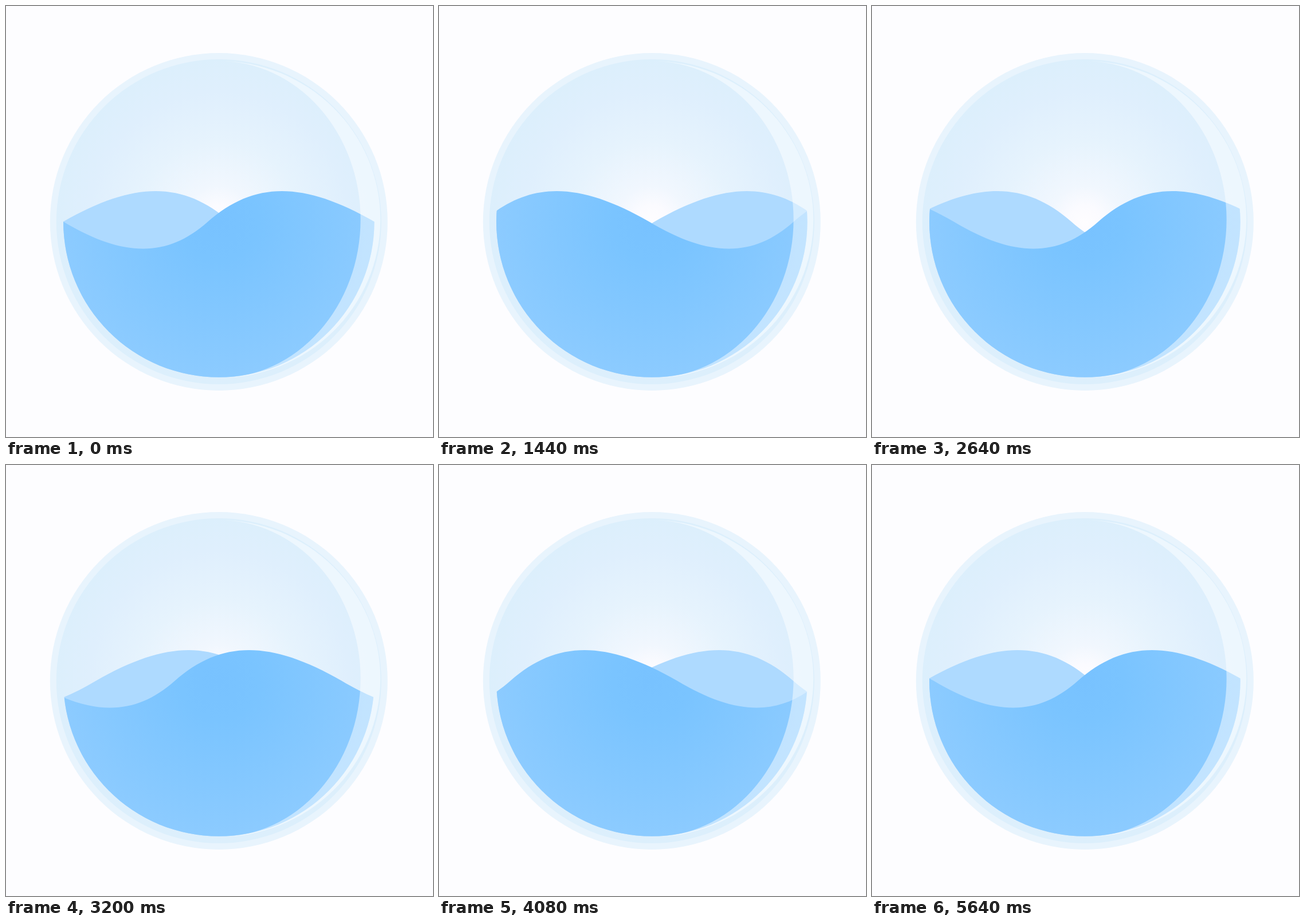
Recreate the animation shown at these times as an HTML page with a canvas. Size 745x752 px, loop 5.68 s.

```html
<!DOCTYPE html>
<html lang="en">
<head>
<meta charset="utf-8">
<title>Water ball</title>
<style>
  html, body { margin: 0; width: 100%; height: 100%; overflow: hidden; background: #fdfdff; }
  canvas { display: block; }
</style>
</head>
<body>
<canvas id="stage" width="745" height="752"></canvas>
<script>
const ctx = document.getElementById('stage').getContext('2d');
const CX = 371.3, CY = 376.5, RADIUS = 271.3;
const WAVE = RADIUS * 2;
const LOOP = 5680, STEP = 40;

// [time in ms, distance the front wave has moved left]; equal times make a jump
const TRAVEL = [
  [0, 0], [40, 7.5], [199, 7.5], [199, 36], [800, 152], [2080, 400],
  [3200, 600], [4080, 770], [4840, 920], [5640, 1078], [LOOP, WAVE * 2]
];

function travelAt(time) {
  const i = TRAVEL.findIndex(([t]) => t > time);
  const [t0, d0] = TRAVEL[i - 1], [t1, d1] = TRAVEL[i];
  return d0 + (d1 - d0) * (time - t0) / (t1 - t0);
}

function radial(radius, ...colors) {
  const g = ctx.createRadialGradient(CX, CY, 0, CX, CY, radius);
  colors.forEach(([at, color]) => g.addColorStop(at, color));
  return g;
}

const AIR = radial(283.5, [0, '#fefdff'], [0.1, '#fbfbff'], [0.22, '#f1f7fe'],
  [0.5, '#e6f3fd'], [0.8, '#dfeffd'], [1, '#dceffc']);
const WATER = radial(RADIUS, [0, '#78c2ff'], [0.25, '#7ac4ff'], [1, '#8ccbff']);

function disc(radius, fill) {
  ctx.beginPath();
  ctx.arc(CX, CY, radius, 0, Math.PI * 2);
  ctx.fillStyle = fill;
  ctx.fill();
}

// Each period is two cubic arcs: a tall crest, then a shallower trough.
function wave(crest, fill) {
  ctx.beginPath();
  ctx.moveTo(crest - 129, CY);
  for (let i = 0, x = crest; i < 4; i++, x += WAVE) {
    ctx.bezierCurveTo(x - 48, CY - 71.3, x + 38, CY - 71.3, x + 162, CY);
    ctx.bezierCurveTo(x + 267, CY + 62.7, x + 343, CY + 62.7, x + WAVE - 129, CY);
  }
  ctx.lineTo(crest + WAVE * 4, 752);
  ctx.lineTo(crest - 129, 752);
  ctx.fillStyle = fill;
  ctx.fill();
}

function highlight() {
  const half = Math.PI / 2;
  ctx.beginPath();
  ctx.ellipse(CX, 372.5, 282, 276.5, 0, -half, half);
  ctx.ellipse(CX, 372.5, 247.3, 276.5, 0, half, -half, true);
  ctx.fillStyle = 'rgba(255, 255, 255, 0.47)';
  ctx.fill();
}

function draw(time) {
  const crest = 481 - travelAt(time) % WAVE - WAVE;
  ctx.fillStyle = '#fdfdff';
  ctx.fillRect(0, 0, 745, 752);
  disc(294.5, '#e8f4fd');
  disc(283.5, AIR);

  ctx.save();
  ctx.beginPath();
  ctx.arc(CX, CY, RADIUS, 0, Math.PI * 2);
  ctx.clip();
  ctx.save();
  ctx.translate(CX * 2, 0);
  ctx.scale(-1, 1);
  wave(crest, '#aedaff');
  ctx.restore();
  wave(crest, WATER);
  ctx.restore();

  highlight();
}

const start = performance.now();
function frame() {
  const time = (performance.now() - start) % LOOP;
  draw(Math.floor(time / STEP) * STEP);
  requestAnimationFrame(frame);
}
frame();
</script>
</body>
</html>
```
